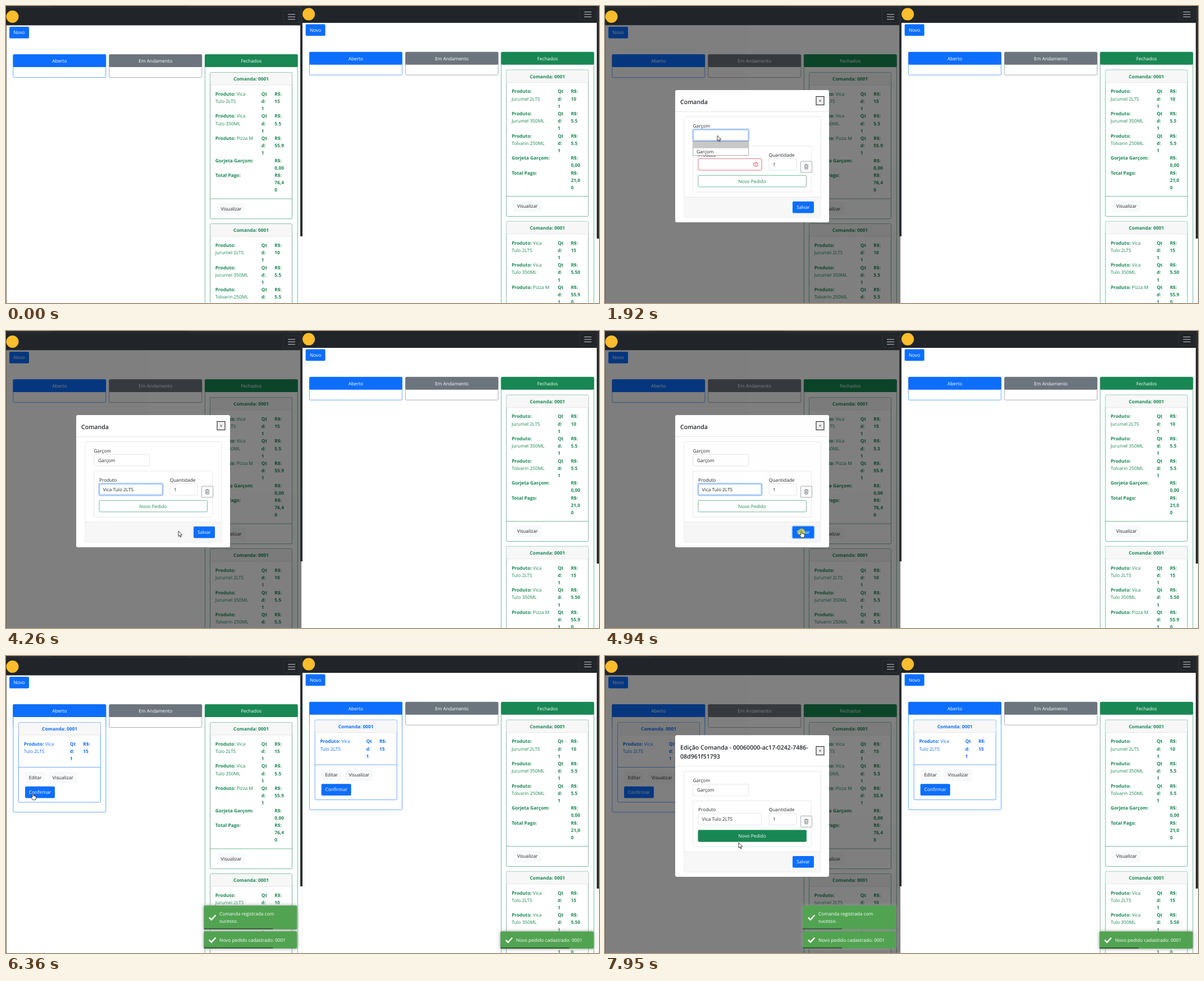
An HTML page that plays this animation: 1056x530 px, repeating every 8000 ms.

```html
<!DOCTYPE html>
<html lang="pt-BR">
<head>
<meta charset="utf-8">
<title>Comandas</title>
<style>
html, body { margin: 0; width: 100%; height: 100%; overflow: hidden; background: #fff; }
#stage { position: relative; width: 1056px; height: 530px; overflow: hidden; font: 8.3px "Open Sans", "Noto Sans", sans-serif; }
svg { position: absolute; left: 0; top: 0; stroke-width: .6; }
text { white-space: pre; text-rendering: geometricPrecision; }
.b { font-weight: 700; }
.m { text-anchor: middle; }
.w { fill: #fff; }
.title { font-size: 10.6px; font-weight: 600; }
.toast { filter: drop-shadow(0 0 3px #999); }
.bar { transform-box: fill-box; transform-origin: left; }
#load { position: absolute; left: 0; top: 34.5px; width: 524px; height: 496px; background: rgba(0, 0, 0, .8); color: #fff; }
#load p { position: absolute; left: 0; top: 278px; width: 524px; margin: 0; line-height: 13px; text-align: center; }
#load i { position: absolute; left: 244.5px; width: 35px; animation: .6153846s -.04s linear infinite; }
#load #jelly { top: 203.5px; height: 35px; background: #fff; border-radius: 10%; animation-name: jelly; }
#load #shade { top: 245px; height: 4px; background: #000; border-radius: 50%; opacity: .2; animation-name: shade; }
@keyframes jelly {
  17% { border-bottom-right-radius: 10%; }
  25% { transform: translateY(25%) rotate(22.5deg); }
  50% { border-bottom-right-radius: 100%; transform: translateY(50%) scale(1, .9) rotate(45deg); }
  75% { transform: translateY(25%) rotate(67.5deg); }
  100% { transform: translateY(0) rotate(90deg); }
}
@keyframes shade { 50% { transform: scale(1.25, 1); } }
</style>
</head>
<body>
<div id="stage">
  <svg id="page" width="1056" height="530"></svg>
  <div id="load"><i id="shade"></i><i id="jelly"></i><p>Carregando...</p></div>
  <svg id="overlay" width="1056" height="530"></svg>
</div>
<script>
const LOOP = 8000, LINE = 13.2;
const BLUE = '#0d6efd', GRAY = '#6c757d', GREEN = '#198754', RED = '#dc3545', INK = '#212529';

const text = (x, y, s, cls = '', fill = '') =>
  `<text x="${x}" y="${y + 3}" class="${cls}"${fill && ` fill="${fill}"`}>${s}</text>`;
const box = (x, y, w, h, fill, stroke = 'none', r = 2, extra = '') =>
  `<rect x="${x}" y="${y}" width="${w}" height="${h}" rx="${r}" fill="${fill}" stroke="${stroke}" ${extra}/>`;
const block = (x, y, w, h, fill) => box(x, y, w, h, fill, 'none', 0);
const rule = (x, y, w, color, weight = .6) => `<path d="M${x} ${y}h${w}" stroke="${color}" stroke-width="${weight}"/>`;
const group = (cls, body, x = 0, y = 0) => `<g transform="translate(${x} ${y})"><g class="${cls}">${body}</g></g>`;
const button = (x, y, w, label, fill = '#f8f9fa', ink = INK) =>
  box(x, y, w, 20.7, fill) + text(x + w / 2, y + 10.2, label, 'm', ink);
const column = (x, y, lines) => lines.map((s, i) => text(x, y + i * LINE, s, 'b')).join('');

// Products: [text beside the label, text on the next line]
const colaBig = ['Vica', 'Tulo 2LTS'], colaSmall = ['Vica', 'Tulo 350ML'];
const fruitBig = ['', 'Jurumel 2LTS'], fruitSmall = ['', 'Jurumel 350ML'];
const beer = ['', 'Tolvarin 250ML'], pizza = ['Pizza M', ''];
const options = ['Vica Tulo 2LTS', 'Jurumel 2LTS', 'Vica Tulo 350ML', 'Jurumel 350ML', 'Tolvarin 250ML',
  'Pizza M', 'Pizza P', 'Pizza G', 'Teste'];

const row = (x, y, [beside, below], price) =>
  text(x, y, `<tspan class="b">Produto:</tspan> ${beside}`) + text(x, y + LINE, below) +
  column(x + 82, y, ['Qt', 'd:', '1']) + column(x + 105.5, y, ['R$:', ...price]);

function card(x, y, h, foot, color, items, total) {
  const tx = x + 9.3, ty = y + 38.3;
  let s = box(x, y, 146, h, '#fff', color) + box(x + .3, y + .3, 145.4, 22.2, '#f7f7f7') +
    rule(x + .3, y + 22.5, 145.4, '#d5dcd8') + text(x + 73, y + 11.7, 'Comanda: 0001', 'b m') +
    rule(x, y + foot, 146, color);
  items.forEach(([name, ...price], i) => s += row(tx, ty + i * 39.6, name, price));
  if (total) {
    s += column(tx, ty + 118.8, ['Gorjeta Garçom:']) + column(tx + 105.5, ty + 118.8, ['R$:', '0,00']) +
      column(tx, ty + 145.2, ['Total Pago:']) + column(tx + 105.5, ty + 145.2, ['R$:', ...total]) +
      button(x + 12, y + 233, 51, 'Visualizar');
  }
  return `<g fill="${color}">${s}</g>`;
}

const lane = (x, h, color, label) =>
  box(x, 86.6, 165, h, '#fff', color) + box(x - .3, 86.3, 165.6, 22.8, color) + text(x + 82.5, 98, label, 'm w');

function board(x, y, first, total, second) {
  const opened = lane(12.8, 192.2, BLUE, 'Aberto') + card(22.5, 118.5, 142.5, 80, BLUE, [[colaBig, '15']]) +
    button(34.5, 206.4, 35, 'Editar') + button(76, 206.4, 50.5, 'Visualizar') +
    button(34, 232.7, 53, 'Confirmar', BLUE, '#fff');
  return group('', block(0, 3.5, 524.5, 31, INK) + '<circle cx="11.5" cy="19" r="11" fill="#fdbd2c"/>' +
    box(493.5, 8.5, 28, 21, 'none', '#373b3e') +
    [15, 19.4, 23.8].map(v => rule(502, v, 13, '#bfc1c2', 1.1)).join('') +
    button(6, 37, 35, 'Novo', BLUE, '#fff') +
    lane(12.8, 41, BLUE, 'Aberto') + lane(183.8, 41, GRAY, 'Em Andamento') + lane(354.3, 470, GREEN, 'Fechados') +
    card(363.5, 118.5, 261.3, 225.5, GREEN, first, total) + card(363.5, 388.7, 261.3, 225.5, GREEN, second, ['']) +
    group('opened', opened), x, y);
}

const ring = (x, y, w) => box(x, y, w, 20.5, 'none', 'rgba(13,110,253,.25)', 2, 'stroke-width="3.4"') +
  box(x, y, w, 20.5, 'none', '#86b7fe');
const invalid = (x, y, w) => box(x, y, w, 20.5, 'none', RED) +
  `<g stroke="${RED}" stroke-width=".9" fill="none"><circle cx="${x + w - 10.5}" cy="${y + 10.2}" r="3.7"/><path d="M${x + w - 10.5} ${y + 7.8}v3m0 .8v1"/></g>`;
const list = (x, y, w, names) => box(x, y, w, 12.15 * (names.length + 1) + .6, '#fff', '#767676', 0) +
  names.map((s, i) => text(x + 6.2, y + 18.2 + i * 12.1, s)).join('');
const strip = (x, y, w) => block(x, y, w, 11.8, '#c8c8c8');

function modal(title, dy, top, height, states) {
  const edge = '#d8d8d8', field = '#ced4da';
  return box(125, top, 274, height, '#fff', 'none', 3) +
    title.map((s, i) => text(134, (dy ? 163 : 171) + i * 16.6 + .6, s, 'title')).join('') +
    box(376, 161.5, 14, 15, '#efefef', '#222', 0, 'stroke-width="1.1"') + text(383, 169, '×', 'm') +
    group('', rule(125, 188.5, 274, edge) + box(141, 197.5, 243, 179.5, '#fff', edge) +
      box(141.3, 341, 242.4, 35.7, '#f7f7f7') + rule(141, 341, 243, edge) +
      text(156.5, 213.5, 'Garçom') + box(156.8, 220.3, 99, 20.5, '#fff', field) +
      box(156.8, 250, 211, 82, '#fff', edge) + text(166, 266, 'Produto') + text(291.8, 266, 'Quantidade') +
      box(166, 272.5, 113, 20.5, '#fff', field) + box(292, 272.5, 49, 20.5, '#fff', field) + text(299, 283, '1') +
      box(348.3, 277, 20.4, 20, '#fafafa', GRAY) +
      `<path d="M354.8 284h7.4M357 284v-1.2h3v1.2M355.6 284.5l.5 6.5h4.8l.5-6.5M357.6 286v3.5M359.4 286v3.5" fill="none" stroke="${GRAY}" stroke-width=".9"/>` +
      box(166, 302.3, 192.5, 20.5, '#fff', GREEN) + text(262, 312.6, 'Novo Pedido', 'm', GREEN) +
      button(334, 348.7, 38, 'Salvar', BLUE, '#fff') + states, 0, dy);
}

const waiter = text(164, 230.6, 'Garçom'), chosen = text(172.8, 283, options[0]);
const newStates =
  group('needWaiter', invalid(156.8, 220.3, 99)) + group('hasWaiter', waiter) + group('ringWaiter', ring(156.8, 220.3, 99)) +
  group('needItem', invalid(166, 272.5, 113)) + group('hasItem', chosen + ring(166, 272.5, 113)) +
  group('ringSave', box(334, 348.7, 38, 20.7, 'none', 'rgba(13,110,253,.4)', 2, 'stroke-width="3"')) +
  group('waiters', list(156.8, 241.5, 99, ['Garçom']) + strip(157.3, 242, 98)) +
  group('items', list(166, 294.5, 113, options) + group('pickNone', strip(166.5, 295, 112)) +
    group('pickFirst', strip(166.5, 306.8, 112) + text(172.2, 312.7, options[0])));
const editStates = waiter + chosen +
  group('hover', box(165.7, 302, 193.1, 21.1, GREEN) + text(262, 312.6, 'Novo Pedido', 'm w'));

document.getElementById('page').innerHTML =
  block(0, 0, 528, 4, '#2a2d30') + block(80, 0, 242, 1, '#1b1d1f') +
  board(0, 0, [[colaBig, '15'], [colaSmall, '5.5'], [pizza, '55.9']], ['76,4', '0'],
    [[fruitBig, '10'], [fruitSmall, '5.5'], [beer, '5.5']]) +
  group('dim', block(0, 34.5, 526, 496, '#000')) + block(0, 34.5, 1, 496, '#666') +
  `<g fill="${INK}">` +
  group('create', modal(['Comanda'], 0, 150, 236, newStates)) +
  group('edit', modal(['Edição Comanda - 00060000-ac17-0242-7486-', '08d961f51793'], 8.4, 141.3, 252.7, editStates)) + '</g>' +
  block(526, 0, 2, 530, '#f8f8f8') + block(524, 0, 4, 411, '#2b2d30') + block(528, 0, 524, 4, INK) +
  board(527.6, -4.4, [[fruitBig, '10'], [fruitSmall, '5.5'], [beer, '5.5']], ['21,0', '0'],
    [[colaBig, '15'], [colaSmall, '5.50'], [pizza, '55.9', '0']]) +
  block(1052, 0, 4, 530, '#f8f8f8') + block(1052, 0, 4, 415, '#2b2d30');

const toast = (x, y, h, lines) => group('toast', box(x, y, 166, h, '#51a351') +
  `<path d="M${x + 9.5} ${y + h / 2}l4 4 7.5-8" fill="none" stroke="#fff" stroke-width="2.5"/>` +
  lines.map((s, i) => text(x + 27.7, y + h / 2 + (i - (lines.length - 1) / 2) * LINE, s, 'w')).join('') +
  `<rect class="bar" x="${x}" y="${y + h - 2.2}" width="166" height="2.2" opacity=".4"/>`);
const order = ['Novo pedido cadastrado: 0001'];

document.getElementById('overlay').innerHTML =
  toast(352.3, 445.3, 42.7, ['Comanda registrada com', 'sucesso.']) + toast(352.3, 491.2, 30.8, order) +
  toast(880.5, 491.6, 30.6, order) +
  group('cursor', group('click', '<circle r="6.5" cy="1" fill="#ffe81a" opacity=".65"/>') +
    '<g fill="#fff" stroke="#111" stroke-width=".8" stroke-linejoin="round">' +
    group('arrow', '<path d="M0 0V9.6L2.2 7.6 3.7 11 5.1 10.4 3.6 7.1 6.7 6.9Z"/>') +
    group('hand', '<path d="M-1 1V6L-2.6 5-3.2 6-.6 10.8H4.6L5.6 6.5 5 4.2 1 3.4V1A1 1 0 0 0-1 1Z"/>') + '</g>');

// Frames are [ms, value]; the end values are held to both ends of the loop.
function track(selector, prop, frames, easing = 'linear') {
  const all = [[0, frames[0][1]], ...frames, [LOOP, frames[frames.length - 1][1]]];
  const keys = all.map(([t, v]) => ({ offset: t / LOOP, [prop]: v, easing }));
  document.querySelectorAll(selector).forEach(el => el.animate(keys, { duration: LOOP, iterations: Infinity }));
}
const fade = (selector, ...frames) => track(selector, 'opacity', frames);
const shown = (selector, ...spans) =>
  track(selector, 'opacity', [[0, 0], ...spans.flatMap(([from, to]) => [[from, 1], [to, 0]])], 'step-end');
const move = (selector, easing, ...frames) =>
  track(selector, 'transform', frames.map(([t, x, y]) => [t, `translate(${x}px, ${y}px)`]), easing);

fade('.dim', [1120, 0], [1270, .5], [5135, .5], [5295, 0], [6960, 0], [7110, .5]);
fade('.create', [1260, 0], [1410, 1], [5040, 1], [5180, 0]);
move('.create', 'ease-out', [1260, 0, -27.5], [1560, 0, 0], [5040, 0, 0], [5340, 0, -27.5]);
fade('.edit', [7250, 0], [7400, 1]);
move('.edit', 'ease-out', [7250, 0, -27.5], [7560, 0, 0]);
fade('.hover', [7690, 0], [7840, 1]);
shown('.opened', [5080, LOOP]);
shown('.needWaiter', [0, 1800]);
shown('.ringWaiter', [1800, 2960]);
shown('.hasWaiter', [2290, LOOP]);
shown('.waiters', [1850, 2290]);
shown('.needItem', [0, 4070]);
shown('.hasItem', [4070, LOOP]);
shown('.ringSave', [4920, LOOP]);
shown('.items', [2870, 4070]);
shown('.pickNone', [2870, 3400]);
shown('.pickFirst', [3400, 4070]);
fade('#load', [4940, 0], [5060, .7], [5160, .37], [5300, 0]);
fade('.toast', [5060, 0], [5360, 1]);
track('.bar', 'transform', [[5060, 'scaleX(1)'], [LOOP, 'scaleX(.412)']]);

move('.cursor', 'ease-in-out', [70, 875, 470], [860, 22, 50], [980, 22, 50], [1250, 32, 62], [1710, 200, 231],
  [1900, 200, 231], [2250, 205, 257], [2520, 205, 257], [2830, 201, 276], [3000, 201, 276], [3270, 205, 297],
  [3600, 208, 309], [4060, 208, 309], [4260, 307, 357], [4700, 350, 358], [5240, 350, 358], [5680, 55, 247],
  [5800, 55, 247], [6360, 48, 246], [6610, 48, 246], [6840, 52, 218], [7000, 52, 218], [7400, 165, 250],
  [7480, 175, 260], [7940, 238, 333]);
shown('.cursor', [60, LOOP]);
const hands = [[800, 1010], [4560, 4960], [5640, 6960], [7720, 7890]];
shown('.hand', ...hands);
track('.arrow', 'opacity', [[0, 1], ...hands.flatMap(([from, to]) => [[from, 0], [to, 1]])], 'step-end');
shown('.click', ...[900, 1800, 2260, 2860, 4020, 4880, 6860].map(t => [t, t + 120]));
</script>
</body>
</html>
```
